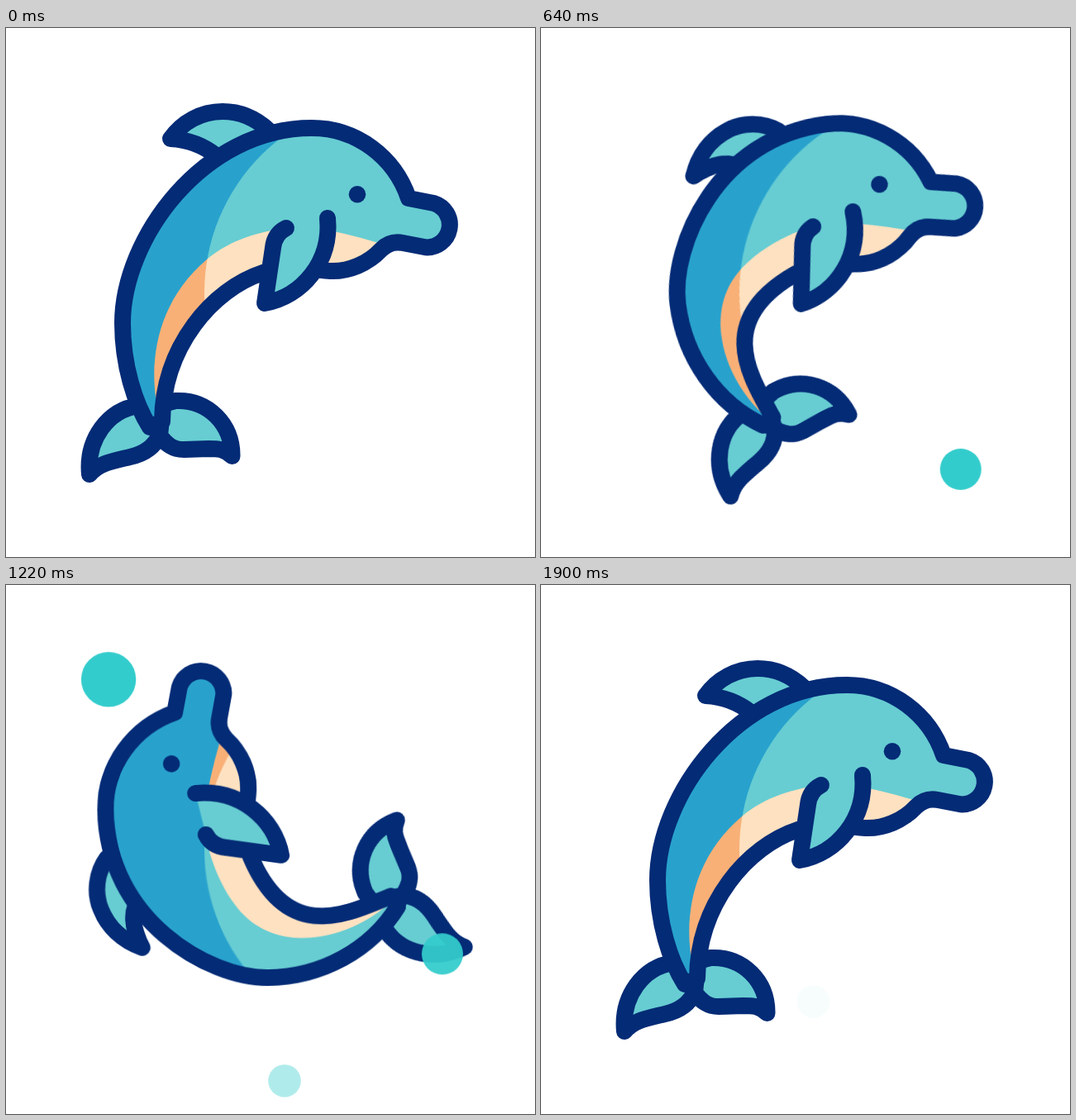
Animation, 640 px wide and 640 px high, one loop 2.4 s. Source, as an HTML page without scripts:

```html
<!DOCTYPE html>
<html lang="en">
<head>
<meta charset="utf-8">
<title>Leaping dolphin</title>
<style>
html, body { margin: 0; width: 100%; height: 100%; overflow: hidden; background: #fff; }
svg { display: block; width: 100vw; height: 100vh; }

.line { stroke: #042b76; stroke-width: 20; stroke-linecap: round; stroke-linejoin: round; }
.teal { fill: #67cdd2; }
.blue { fill: #28a2cd; }
.peach { fill: #f8b077; }
.cream { fill: #fee1c0; }
.none { fill: none; }

/* whole-body turn; the lit circle turns back so it stays still on the stage */
.spin, .unspin { transform-origin: 320px 320px; animation: spin 2.4s infinite; }
.unspin { animation-name: unspin; }
@keyframes spin {
  0% { transform: rotate(0deg); animation-timing-function: ease-in-out; }
  16.667% { transform: rotate(-35.6deg); animation-timing-function: cubic-bezier(.443, 0, .555, 1); }
  68.333%, 100% { transform: rotate(360deg); }
}
@keyframes unspin {
  0% { transform: rotate(0deg); animation-timing-function: ease-in-out; }
  16.667% { transform: rotate(35.6deg); animation-timing-function: cubic-bezier(.443, 0, .555, 1); }
  68.333%, 100% { transform: rotate(-360deg); }
}

/* curl: stretched pose <-> tucked pose */
.body, .belly, .dorsal, .flukes { animation: body 2.4s ease-in-out infinite; }
.belly { animation-name: belly; }
.dorsal { animation-name: dorsal; }
.flukes { animation-name: flukes; transform-origin: 187.5px 529px; }
@keyframes body {
  0%, 68.333%, 100% { d: path("M174 483C156 455 141 408 141 357C141 255 238 121 370 121C424 121 470 156 487 206L517.6 212A27.3 27.3 0 0 1 507.4 265.3L480 260C470 258 461 261 454 268C438 285 415 295 392 294C372 293 350 286 311 296C250 316 190 385 189 476Z"); }
  16.667%, 53.125% { d: path("M249 473C197 440 165 380 165 315C165 244 237 121 370 121C424 121 470 156 487 206L517.6 212A27.3 27.3 0 0 1 507.4 265.3L480 260C470 258 461 261 454 268C438 285 415 295 392 294C372 293 350 286 311 296C205 340 241 412 262 465Z"); }
}
@keyframes belly {
  0%, 68.333%, 100% { d: path("M187 476C170 415 178 335 243 280C270 257 305 246 345 241C365 238 405 246 465 264L470 320L320 340Z"); }
  16.667%, 53.125% { d: path("M258 468C212 420 192 335 241 287C262 266 303 246 345 241C365 238 405 246 465 264L470 320L320 340Z"); }
}
@keyframes dorsal {
  0%, 68.333%, 100% { d: path("M255 155C240 143 222 135 199 134C213 114 236 101 262 101C285 101 303 110 318 124"); }
  16.667%, 53.125% { d: path("M258 160C250 150 228 151 203 163.5C212 139 229 122 250 114C271 106 294 109 312 122"); }
}
@keyframes flukes {
  0%, 68.333%, 100% { transform: translate(0, 0) rotate(0deg); }
  16.667%, 53.125% { transform: translate(89.4px, -15.8px) rotate(-20.15deg); }
}

.bubble { fill: #3cc; opacity: 0; animation: right 2.4s linear infinite; }
.bubble.left { animation-name: left; }
.bubble.low { animation-name: low; }
@keyframes right {
  0%, 15% { transform: translate(510px, 575px); opacity: 0; }
  19.167% { transform: translate(509px, 560px); opacity: .73; }
  20.833% { opacity: 1; }
  25.833% { transform: translate(507px, 537px); }
  32.5% { transform: translate(512.5px, 513px); }
  40% { transform: translate(529px, 487px); }
  45.417% { transform: translate(532px, 466.5px); }
  50% { opacity: 1; }
  50.833% { transform: translate(528px, 446.5px); opacity: .95; }
  56.667%, 100% { transform: translate(519px, 426px); opacity: 0; }
}
@keyframes left {
  0%, 35.833% { transform: translate(116px, 155px); opacity: 0; }
  40% { transform: translate(117.3px, 143.5px); opacity: .73; }
  41.667% { opacity: 1; }
  50.833% { transform: translate(124px, 114.3px); }
  58.75% { opacity: 1; }
  63.333% { transform: translate(145px, 89.3px); opacity: .22; }
  65%, 100% { transform: translate(147px, 88px); opacity: 0; }
}
@keyframes low {
  0%, 48.333% { transform: translate(339px, 608px); opacity: 0; }
  50.833% { transform: translate(337px, 600px); opacity: .38; }
  55% { opacity: 1; }
  63.333% { transform: translate(323px, 553px); }
  67.5% { transform: translate(323.5px, 537px); }
  73.333% { opacity: 1; }
  79.167%, 100% { transform: translate(329.5px, 504px); opacity: .04; }
}
</style>
</head>
<body>
<svg viewBox="0 0 640 640">
  <defs>
    <clipPath id="bodyClip"><path class="body"/></clipPath>
    <clipPath id="bellyClip"><path class="belly"/></clipPath>
  </defs>

  <g class="spin">
    <g class="flukes line teal">
      <path d="M186 492C180 506 168 515 150 519C125 525 112 527 101 540C97 497 124 462 160 457Z"/>
      <path d="M186 493C194 504 202 510 215 510L245 509C256 509 264 509 273.5 518C274 480 245 449 205 451L190 455Z"/>
    </g>
    <path class="dorsal line teal"/>

    <g clip-path="url(#bodyClip)">
      <rect class="blue" width="640" height="640"/>
      <g class="unspin"><circle class="teal" cx="475" cy="320" r="235"/></g>
      <g clip-path="url(#bellyClip)">
        <rect class="peach" width="640" height="640"/>
        <g class="unspin"><circle class="cream" cx="475" cy="320" r="235"/></g>
      </g>
    </g>
    <path class="body line none"/>

    <path class="line teal" d="M339 242C329 247 324 256 323 266L313 333C358 325 394 283 389 230"/>
    <circle cx="425" cy="201.300" r="10.300" fill="#042b76"/>
  </g>

  <circle class="bubble" r="25"/>
  <circle class="bubble left" r="33.200"/>
  <circle class="bubble low" r="19.800"/>
</svg>
</body>
</html>
```
